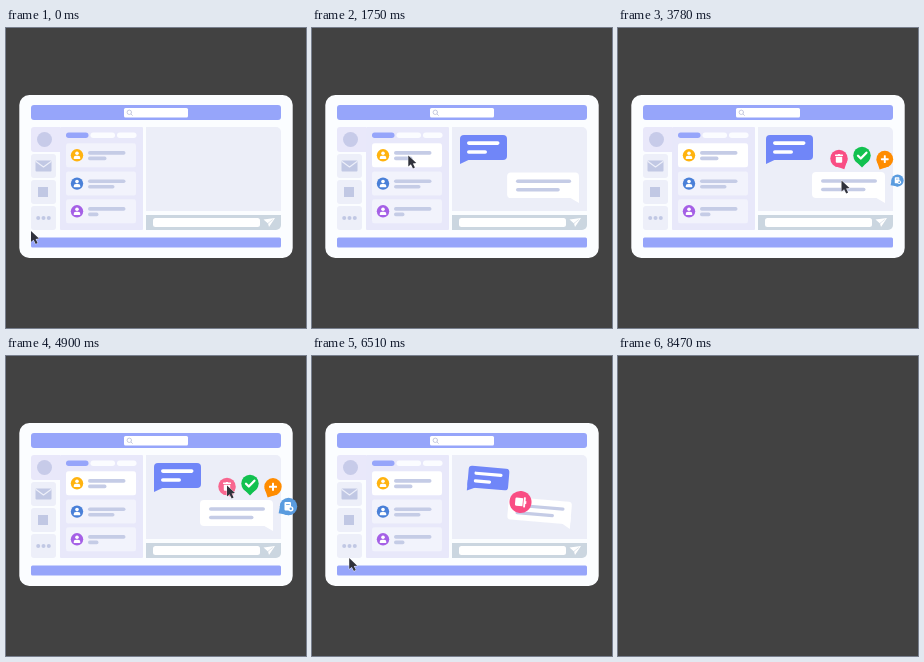
Animation, 300 px wide and 300 px high, one loop 8540 ms. Source, as an HTML page with a canvas:

```html
<!DOCTYPE html>
<html lang="en">
<head>
<meta charset="utf-8">
<title>Chat inbox</title>
<style>
  html, body { margin: 0; width: 100%; height: 100%; overflow: hidden; background: #424242; }
  canvas { display: block; width: 300px; height: 300px; }
</style>
</head>
<body>
<canvas id="stage" width="300" height="300"></canvas>
<script>
const ctx = document.getElementById('stage').getContext('2d');
const LOOP = 8540, STEP = 70;
const BAR = '#96a5fa', LINE = '#c5cce6', PINK = '#f94d84';

const clamp = v => Math.max(0, Math.min(1, v));
const span = (t, from, to) => clamp((t - from) / (to - from));
const mix = (a, b, p) => a + (b - a) * p;
const inOut = p => p < .5 ? 2 * p * p : 1 - 2 * (1 - p) ** 2;
const out = p => 1 - (1 - p) ** 3;

function box(x, y, w, h, r, color) {
  ctx.fillStyle = color;
  ctx.beginPath();
  ctx.roundRect(x, y, w, h, r);
  ctx.fill();
}

function disc(x, y, r, color) {
  ctx.fillStyle = color;
  ctx.beginPath();
  ctx.arc(x, y, r, 0, 7);
  ctx.fill();
}

function poly(color, ...pts) {
  ctx.fillStyle = color;
  ctx.beginPath();
  for (let i = 0; i < pts.length; i += 2) ctx.lineTo(pts[i], pts[i + 1]);
  ctx.closePath();
  ctx.fill();
}

function stroke(color, width, ...pts) {
  ctx.strokeStyle = color;
  ctx.lineWidth = width;
  ctx.lineCap = ctx.lineJoin = 'round';
  ctx.beginPath();
  for (let i = 0; i < pts.length; i += 2) ctx.lineTo(pts[i], pts[i + 1]);
  ctx.stroke();
}

// Draws around (x, y) with local origin there.
function at(x, y, scale, angle, draw) {
  if (scale <= 0) return;
  ctx.save();
  ctx.translate(x, y);
  ctx.rotate(angle);
  ctx.scale(scale, scale);
  draw();
  ctx.restore();
}

function sidebar() {
  box(25, 99, 29, 25, [3, 0, 0, 3], '#e9e8fa');
  for (const y of [126, 152, 178]) box(25, y, 25, 24, 3, '#edeff9');
  disc(38.5, 111.5, 7.5, '#c7cbe9');
  box(29.5, 132.5, 16, 11, 1, '#c1c8e4');
  stroke('#edeff9', 1.2, 30, 133.5, 37.5, 139, 45, 133.5);
  box(32, 159, 10, 10, 0, '#c1c8e4');
  for (const x of [32.2, 37.5, 42.8]) disc(x, 190, 2, '#c1c8e4');
}

function contact(y, color, shortLine, active) {
  box(60, y, 70, 24, 2.5, active ? '#ffffff' : '#f2f3fc');
  disc(71, y + 12, 6.2, color);
  disc(71, y + 10, 1.8, '#fff');
  box(67.6, y + 12.5, 6.8, 3.2, [3, 3, 1, 1], '#fff');
  box(82, y + 7.8, 37.5, 3.6, 1.8, LINE);
  box(82, y + 13.3, shortLine, 3.6, 1.8, LINE);
}

function windowFrame(active) {
  box(13.3, 67, 273.4, 163, 10, '#fbfdff');
  box(25, 77, 250, 15, 3, BAR);
  box(118, 80, 64, 9.5, 1.5, '#fff');
  ctx.strokeStyle = '#c0c5dc';
  ctx.lineWidth = .9;
  ctx.beginPath();
  ctx.arc(123.3, 84.3, 2.2, 0, 7);
  ctx.stroke();
  stroke('#c0c5dc', .9, 125, 86, 126.4, 87.4);
  box(25, 209.5, 250, 10, 1.5, BAR);

  box(54, 99, 83, 103, 1, '#e8e8fa');
  sidebar();
  box(60, 104.5, 22.5, 5.5, 2.7, BAR);
  box(84.5, 104.5, 24.5, 5.5, 2.7, '#fbfcff');
  box(111, 104.5, 19.5, 5.5, 2.7, '#fbfcff');
  contact(115.3, '#ffb30f', 18.5, active);
  contact(143.6, '#4a80d8', 26.5);
  contact(171.3, '#a560e6', 10.5);

  box(140, 99, 135, 84, [0, 5, 0, 0], '#eceef8');
  box(140, 187, 135, 15, [0, 0, 5, 0], '#cbd6e0');
  box(147, 190, 107, 9, 2.5, '#fff');
  poly('#fff', 257.5, 191.5, 269, 190, 263, 199, 262, 195.5);
  stroke('#cbd6e0', .6, 262, 195.3, 266.5, 191.8);
}

function leftBubble() {
  const c = '#7086f8';
  box(-23.5, -12.5, 47, 25, 4, c);
  poly(c, -23.5, 4, -23.5, 16.5, -14, 12);
  box(-16.5, -6.2, 32.5, 3.6, 1.8, '#fff');
  box(-16.5, 2.7, 20, 3.6, 1.8, '#fff');
}

function rightBubble() {
  box(-36.5, -13, 73, 26, 4, '#fff');
  poly('#fff', 36.5, 4, 36.5, 18, 27, 12.5);
  box(-27.5, -5.8, 56, 3.6, 1.8, LINE);
  box(-27.5, 2.7, 44.5, 3.6, 1.8, LINE);
}

function bubbles(t) {
  const suck = span(t, 6230, 7000) ** 2;
  const list = [
    [171.5, 119.5, 1330, leftBubble, -23, 16],
    [230.5, 157, 1540, rightBubble, 36, 18]
  ];
  for (const [x, y, start, draw, tipX, tipY] of list) {
    const grow = out(span(t, start, start + 280));
    const px = mix(x, 208.5, suck) + tipX * (1 - grow);
    const py = mix(y, 138 + 8 * suck, suck) + tipY * (1 - grow);
    at(px, py, grow * (1 - suck), suck * .65, draw);
  }
}

const glyphs = {
  bin() {
    box(-3.2, -1.8, 6.4, 6, [0, 0, 1, 1], '#fff');
    box(-4, -3.9, 8, 1.5, .5, '#fff');
    box(-1.2, -4.6, 2.4, 1, .3, '#fff');
  },
  check() { stroke('#fff', 2.3, -4, .2, -1.2, 3, 4.4, -2.8); },
  plus() {
    box(-4, -1, 8, 2, .5, '#fff');
    box(-1, -4, 2, 8, .5, '#fff');
  },
  note() {
    box(-4, -4.5, 6.5, 8.5, 1, '#fff');
    stroke('#5a9cdf', .8, -2.2, -2, .8, -2);
    disc(2.3, 2.3, 2.6, '#fff');
    disc(2.3, 2.3, 1.2, '#5a9cdf');
  }
};

function pin(x, y, color, glyph, scale, tail = 1) {
  const angle = Math.atan2(x - 244, 177 - y);
  const shift = 12 * (1 - scale) * tail;
  at(x - Math.sin(angle) * shift, y + Math.cos(angle) * shift, scale, 0, () => {
    if (tail > 0) at(0, 0, 1, angle, () => poly(color, -7.4, 4.5, 0, 4.5 + 7.5 * tail, 7.4, 4.5));
    disc(0, 0, 8.7, color);
    glyph();
  });
}

function actions(t) {
  const pop = i => out(span(t, 3500 + i * STEP, 3710 + i * STEP));
  const hide = 1 - inOut(span(t, 5040, 5390));
  pin(282.5, 150.5, '#5a9cdf', glyphs.note, pop(3) * hide);
  pin(267, 130.8, '#ff8c00', glyphs.plus, pop(2) * hide);
  pin(244, 127.5, '#12c150', glyphs.check, pop(1) * hide);

  const go = inOut(span(t, 5110, 5670));
  const vanish = 1 - span(t, 7200, 8260) ** 1.2;
  const spin = Math.max(0, t - 6160) * .00474;
  const color = t >= 4830 && t < 5180 ? '#f8668f' : PINK;
  if (go < 1) {
    pin(mix(221, 208.5, go), mix(130.5, 146, go), color, glyphs.bin, pop(0) * mix(1, 1.27, go), 1 - go);
  } else {
    at(208.5, 146, 1.27 * vanish, spin, () => {
      disc(0, 0, 8.7, PINK);
      glyphs.bin();
    });
  }
}

// Each move: start, end, target x, target y, downward bow.
const moves = [
  [350, 840, 96.3, 127.5, 0],
  [2380, 2870, 223.5, 152.5, 0],
  [4550, 4900, 221, 129.5, 0],
  [5810, 6660, 25, 203, 7]
];
const clicks = [1050, 3150, 5110];

function cursor(t) {
  let x = 25, y = 203;
  for (const [from, to, tx, ty, bow] of moves) {
    const p = span(t, from, to), e = inOut(p);
    x = mix(x, tx, e);
    y = mix(y, ty, e) + bow * Math.sin(Math.PI * p);
  }
  let scale = 1;
  for (const c of clicks) scale -= .2 * Math.sin(Math.PI * span(t, c - STEP, c + 210));
  at(x, y, scale, 0, () => {
    const shape = [0, 0, 0, 11, 2.6, 8.8, 4.7, 13, 6.6, 12, 4.6, 8, 8, 7.6];
    stroke('rgba(255,255,255,.8)', 1, ...shape, 0, 0);
    poly('#30323c', ...shape);
  });
}

function draw(t) {
  ctx.fillStyle = '#424242';
  ctx.fillRect(0, 0, 300, 300);
  if (t >= 8470) return;
  windowFrame(t >= 1120 && t < 6930);
  bubbles(t);
  actions(t);
  cursor(t);
}

const begin = performance.now();
function tick() {
  const t = (performance.now() - begin) % LOOP;
  draw(Math.floor(t / STEP) * STEP);
  requestAnimationFrame(tick);
}
tick();
</script>
</body>
</html>
```
